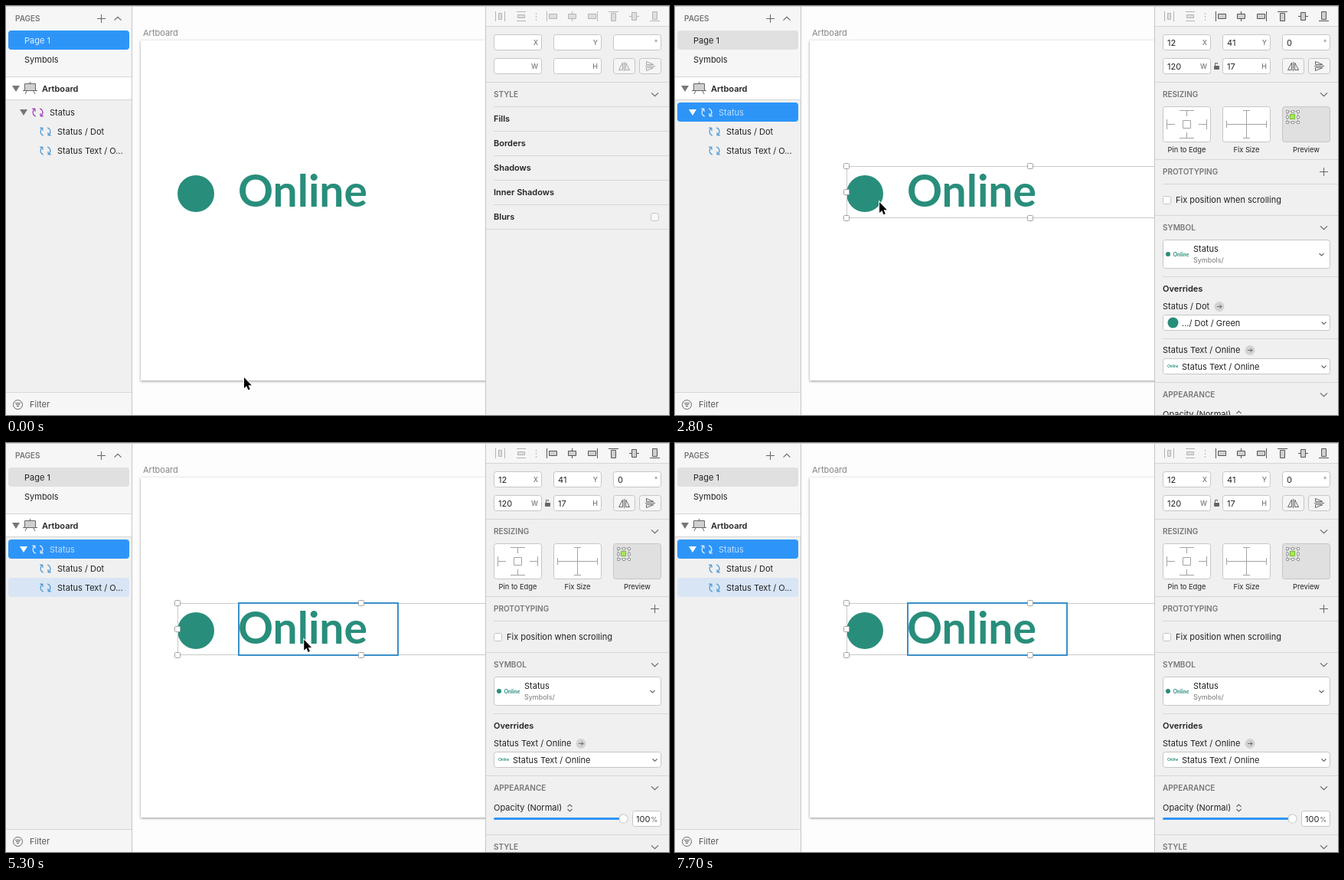
Recreate the animation shown at these times as an HTML page with a canvas. Size 866 by 534 pixels, loop 7.8 s.

```html
<!DOCTYPE html>
<html lang="en">
<head>
<meta charset="utf-8">
<title>Nested symbol selection</title>
<style>
html, body { margin: 0; width: 100%; height: 100%; overflow: hidden; background: #fff; }
canvas { display: block; width: 866px; height: 534px; }
</style>
</head>
<body>
<canvas id="stage" width="866" height="534"></canvas>
<script>
const ctx = document.getElementById('stage').getContext('2d');
const LOOP = 7800, STEP = 100;
const UI = 'Inter, "Noto Sans", sans-serif', DISPLAY = 'Lato, sans-serif';
const INK = '#222', MUTED = '#777', LINE = '#d6d6d6', EDGE = '#c6c6c6';
const BLUE = '#2e95f8', OUTLINE = '#3a8fca', TEAL = '#288e7b', PANEL = '#f0f0f0', LIGHT = '#f6f6f6';

// time, x, y of the pointer tip
const POINTER = [
  [0, 311, 485], [800, 297, 270], [1100, 294, 261], [1600, 293, 253], [1900, 293, 253],
  [2700, 268, 256], [3200, 259, 256], [3500, 259, 256], [4300, 284, 262], [4700, 298, 256],
  [5000, 389, 257], [5200, 389, 257], [5500, 390, 256], [6400, 390, 257],
  [7200, 376, 449], [7600, 364, 540], [7800, 364, 540]
];
const CLICKS = [[1400, 1600], [3200, 3500], [4900, 5100]];

function pointerAt(t) {
  const i = Math.max(1, POINTER.findIndex(p => p[0] > t));
  const [t0, x0, y0] = POINTER[i - 1], [t1, x1, y1] = POINTER[i];
  const u = (t - t0) / (t1 - t0), k = u * u * (3 - 2 * u);
  return [x0 + (x1 - x0) * k, y0 + (y1 - y0) * k];
}

function text(s, x, y, { size = 11, weight = 400, color = INK, align = 'left', family = UI } = {}) {
  ctx.font = `${weight} ${size}px ${family}`;
  ctx.fillStyle = color;
  ctx.textAlign = align;
  ctx.fillText(s, x, y);
}
const bold = (s, x, y) => text(s, x, y, { weight: 600 });
const heading = (s, y, x = 637) => text(s, x, y, { size: 10, weight: 600, color: MUTED });

function fill(x, y, w, h, color) {
  ctx.fillStyle = color;
  ctx.fillRect(x, y, w, h);
}

function box(x, y, w, h, r, color, edge) {
  ctx.beginPath();
  ctx.roundRect(edge ? x + .5 : x, edge ? y + .5 : y, edge ? w - 1 : w, edge ? h - 1 : h, r);
  if (color) { ctx.fillStyle = color; ctx.fill(); }
  if (edge) { ctx.strokeStyle = edge; ctx.lineWidth = 1; ctx.stroke(); }
}

function disc(x, y, r, color) {
  ctx.beginPath();
  ctx.arc(x, y, r, 0, 7);
  ctx.fillStyle = color;
  ctx.fill();
}

function path(points, color, width = 1, closed = false) {
  ctx.beginPath();
  points.forEach(([x, y]) => ctx.lineTo(x, y));
  if (closed) ctx.closePath();
  ctx.strokeStyle = color;
  ctx.lineWidth = width;
  ctx.stroke();
}

function polygon(points, color) {
  ctx.beginPath();
  points.forEach(([x, y]) => ctx.lineTo(x, y));
  ctx.fillStyle = color;
  ctx.fill();
}

const rule = (y, x = 627) => fill(x, y, 866 - x, 1, LINE);
const chevron = (x, y, w = 4.5, h = 2.2, color = '#666') =>
  path([[x - w, y - h], [x, y + h], [x + w, y - h]], color, 1.1);

function plus(x, y) {
  fill(x - 5, y, 11, 1, '#666');
  fill(x, y - 5, 1, 11, '#666');
}

function frame(x, y, w, h) {
  ctx.strokeStyle = OUTLINE;
  ctx.lineWidth = 2;
  ctx.strokeRect(x + 1, y + 1, w - 2, h - 2);
}

function symbolIcon(x, y, color) {
  ctx.strokeStyle = color;
  ctx.lineWidth = 1.2;
  for (const side of [-1, 1]) {
    ctx.beginPath();
    ctx.arc(x + side, y, 5.4, side < 0 ? 1.9 : -1.25, side < 0 ? 4.2 : 1.05);
    ctx.stroke();
    const tx = x + side * 3.7, ty = y + side * 4.7;
    path([[tx - side * .3, ty - side * 3.6], [tx, ty], [tx + side * 3.6, ty + side * .2]], color, 1.2);
  }
}

function sidebar(s) {
  fill(0, 0, 164, 534, PANEL);
  fill(0, 0, 164, 92, LIGHT);
  heading('PAGES', 20, 12);
  plus(124, 16);
  chevron(146, 16.5, 4.5, -2.2);
  box(3, 32, 158, 25, 4, s.selected ? '#e0e0e0' : BLUE);
  text('Page 1', 24, 49, { color: s.selected ? INK : '#e4f1ff' });
  text('Symbols', 24, 74);

  fill(0, 92, 164, 31, LINE);
  fill(0, 93, 164, 29, '#fff');
  polygon([[8, 104], [18, 104], [13, 112]], '#777');
  box(24, 101, 15, 10, 0, '#d0d0d0', '#666');
  fill(22, 110, 19, 1, '#666');
  path([[27, 111], [25, 115]], '#666');
  path([[36, 111], [38, 115]], '#666');
  fill(31, 99, 1, 2, '#666');
  bold('Artboard', 47, 112);

  if (s.hover) box(3, 126, 158, 25, 4, '#ececec', '#c9c9c9');
  if (s.selected) {
    box(3, 126, 158, 25, 4, BLUE);
    if (s.part) box(3, s.part === 'dot' ? 151 : 176, 158, 25, 4, '#d8e5f5');
  }
  polygon([[18, 135], [28, 135], [23, 143]], s.selected ? '#fff' : '#777');
  symbolIcon(41.5, 139, s.selected ? '#e9f4ff' : '#9b35b8');
  text('Status', 57, 143, { color: s.selected ? '#bfdfff' : INK });
  symbolIcon(51.5, 164, '#4596d3');
  text('Status / Dot', 67, 168);
  symbolIcon(51.5, 189, '#4596d3');
  text('Status Text / O...', 67, 193);

  fill(0, 504, 164, 30, LIGHT);
  fill(0, 504, 164, 1, LINE);
  ctx.beginPath();
  ctx.arc(15.5, 520.5, 6, 0, 7);
  ctx.strokeStyle = '#666';
  ctx.lineWidth = 1;
  ctx.stroke();
  [[12, 7], [13, 5], [14, 3]].forEach(([x, w], i) => fill(x, 518 + i * 2, w, 1, '#666'));
  text('Filter', 31, 524, { color: '#555' });
  fill(164, 0, 1, 534, EDGE);
}

function artboard(s) {
  fill(165, 0, 461, 534, '#fdfdfd');
  ctx.save();
  ctx.beginPath();
  ctx.rect(165, 0, 461, 534);
  ctx.clip();
  text('Artboard', 179, 39, { color: '#858585' });
  ctx.shadowColor = 'rgba(0,0,0,.42)';
  ctx.shadowBlur = 3;
  ctx.shadowOffsetY = 1;
  fill(176, 45, 520, 444, '#fff');
  ctx.shadowColor = 'transparent';

  disc(248, 245, 24, TEAL);
  text('Online', 303, 262, { size: 57, weight: 700, color: TEAL, family: DISPLAY });
  if (s.hover) frame(223, 208, 480, 70);
  if (s.selected) {
    ctx.strokeStyle = '#c9c9c9';
    ctx.lineWidth = 1;
    ctx.strokeRect(224.5, 209.5, 480, 67);
    if (s.part === 'dot') frame(223, 220, 50, 50);
    if (s.part === 'text') frame(303, 208, 210, 70);
    for (const [x, y] of [[224, 209], [464, 209], [224, 243], [224, 277], [464, 277]])
      box(x - 4, y - 4, 8, 8, 1, '#fff', '#a2a2a2');
  }
  ctx.restore();
}

function alignIcons(active) {
  const off = '#b4b4b4', on = active ? '#555' : off, body = active ? '#cfcfcf' : '#dedede';
  fill(639, 7, 1, 13, off); fill(651, 7, 1, 13, off);
  box(643, 9, 5, 9, 0, '#dedede', off);
  fill(667, 7, 12, 1, off); fill(667, 19, 12, 1, off);
  box(668, 11, 10, 5, 0, '#dedede', off);
  for (const y of [9, 13, 17]) fill(692, y, 1, 2, off);
  [[706, 709], [739, 734], [772, 760]].forEach(([x, bx]) => {
    fill(x, 7, 1, 13, on);
    box(bx, 10, 11, 7, 0, body, on);
  });
  [[7, 9], [13, 8], [19, 7]].forEach(([y, by], i) => {
    const x = 787 + 27 * i;
    fill(x, y, 13, 1, on);
    box(x + 3, by, 7, 11, 0, body, on);
  });
}

function field(x, y, value, label) {
  box(x, y, 63, 21, 3, '#fff', EDGE);
  text(value, x + 6, y + 15);
  text(label, x + 58, y + 14, { size: 9, weight: 500, color: MUTED, align: 'right' });
}

function geometry(active) {
  const v = active ? ['12', '41', '0', '120', '17'] : ['', '', '', '', ''];
  field(637, 37, v[0], 'X');
  field(715, 37, v[1], 'Y');
  field(793, 37, v[2], '°');
  field(637, 68, v[3], 'W');
  field(715, 68, v[4], 'H');
  const c = active ? '#666' : '#a5a5a5';
  box(793, 68, 29, 21, 3, '#f5f5f5', EDGE);
  box(827, 68, 29, 21, 3, '#f5f5f5', EDGE);
  fill(807, 73, 1, 12, c);
  path([[805.5, 74], [805.5, 83.5], [800.5, 83.5]], c, 1, true);
  path([[809.5, 74], [809.5, 83.5], [814.5, 83.5]], c, 1, true);
  fill(835, 78, 13, 1, c);
  path([[836.5, 72.5], [836.5, 76.5], [846, 76.5]], c, 1, true);
  path([[836.5, 84.5], [836.5, 80.5], [846, 80.5]], c, 1, true);
  if (active) {
    box(704, 78, 7, 5, 1, '#666');
    path([[705.5, 78], [705.5, 74.5], [708.5, 74.5], [708.5, 76]], '#666');
  }
  rule(99);
}

function emptyInspector() {
  heading('STYLE', 119);
  chevron(847.5, 115.5);
  ['Fills', 'Borders', 'Shadows', 'Inner Shadows', 'Blurs'].forEach((name, i) => {
    rule(131 + 32 * i, 637);
    bold(name, 637, 151 + 32 * i);
  });
  box(842, 270, 11, 11, 3, '#f8f8f8', '#c2c2c2');
  rule(291);
}

function resizing() {
  heading('RESIZING', 119);
  chevron(847.5, 115.5);
  [637, 715, 793].forEach((x, i) => box(x, 131, 63, 47, 3, i < 2 ? '#fff' : '#e0e0e0', EDGE));
  const c = '#a2a2a2';
  box(663, 149, 11, 11, 0, '#fff', c);
  fill(668, 136, 1, 8, c); fill(668, 165, 1, 8, c);
  fill(642, 154, 11, 1, c); fill(684, 154, 11, 1, c);
  fill(659, 136, 19, 1, c); fill(659, 172, 19, 1, c);
  fill(642, 148, 1, 13, c); fill(694, 148, 1, 13, c);
  fill(720, 154, 53, 1, c); fill(746, 136, 1, 37, c);
  fill(720, 150, 1, 9, c); fill(772, 150, 1, 9, c);
  fill(742, 136, 9, 1, c); fill(742, 172, 9, 1, c);
  box(799, 137, 15, 15, 0, null, '#aaa');
  box(803, 141, 7, 7, 0, '#a4e858', '#79bd32');
  for (const x of [799, 806, 813]) for (const y of [137, 144, 151])
    if (x !== 806 || y !== 144) box(x - 1, y - 1, 4, 4, 0, '#fff', '#999');
  [['Pin to Edge', 668], ['Fix Size', 746], ['Preview', 824]].forEach(([s, x]) =>
    text(s, x + .5, 191, { size: 9.3, align: 'center' }));
}

function override(y, isDot) {
  const label = isDot ? 'Status / Dot' : 'Status Text / Online';
  const ax = isDot ? 711 : 751;
  text(label, 637, y);
  disc(ax, y - 3.5, 6.5, '#d3d3d3');
  path([[ax - 3, y - 3.5], [ax + 3, y - 3.5]], '#666');
  path([[ax + .5, y - 6], [ax + 3, y - 3.5], [ax + .5, y - 1]], '#666');
  box(637, y + 7, 219, 21, 3, '#fff', EDGE);
  if (isDot) {
    disc(650.5, y + 17.5, 7, TEAL);
    text('.../ Dot / Green', 662, y + 22);
  } else {
    text('Online', 643, y + 19, { size: 4.8, weight: 700, color: TEAL, family: DISPLAY });
    text(label, 662, y + 22);
  }
  chevron(847.5, y + 18, 3, 1.5);
}

function appearance(y) {
  rule(y);
  heading('APPEARANCE', y + 20);
  chevron(847.5, y + 16.5);
  text('Opacity (Normal)', 637, y + 46);
  chevron(736.5, y + 39.5, 3, -1.5);
  chevron(736.5, y + 45.5, 3, 1.5);
  box(637, y + 55, 168, 3, 1.5, BLUE);
  disc(806.5, y + 56.5, 6, '#b9b9b9');
  disc(806.5, y + 56.5, 5.2, '#fff');
  box(818, y + 46, 38, 21, 3, '#fff', EDGE);
  text('100', 823, y + 61);
  text('%', 851, y + 61, { size: 9, color: '#666', align: 'right' });
  rule(y + 77);
  heading('STYLE', y + 97);
  chevron(847.5, y + 93.5);
}

function symbolInspector(part) {
  resizing();
  rule(200);
  heading('PROTOTYPING', 220);
  plus(847, 216);
  rule(232, 637);
  box(637, 248, 11, 11, 2, '#fff', '#c4c4c4');
  text('Fix position when scrolling', 654, 257);
  rule(273);
  heading('SYMBOL', 293);
  chevron(847.5, 289.5);
  box(637, 305, 219, 38, 3, '#fff', EDGE);
  disc(644, 324, 3, TEAL);
  text('Online', 650.5, 326.5, { size: 7, weight: 700, color: TEAL, family: DISPLAY });
  text('Status', 677, 321);
  text('Symbols/', 677, 335, { size: 9, color: MUTED });
  chevron(844.5, 324.5, 3, 1.5);
  rule(353, 637);
  bold('Overrides', 637, 373);
  override(396, part !== 'text');
  if (part) return appearance(434);
  rule(434, 637);
  override(453, false);
  appearance(491);
}

function inspector(s) {
  fill(626, 0, 240, 534, PANEL);
  fill(627, 0, 239, 26, LIGHT);
  rule(26);
  alignIcons(s.detail);
  geometry(s.detail);
  if (s.detail) symbolInspector(s.detailPart);
  else emptyInspector();
  fill(626, 0, 1, 534, EDGE);
}

function pointer(x, y, pressed) {
  if (pressed) {
    for (const [color, width] of [['rgba(255,255,255,.9)', 4], ['#111', 1.8]]) {
      ctx.beginPath();
      ctx.arc(x, y + 1, 21.5, 0, 7);
      ctx.strokeStyle = color;
      ctx.lineWidth = width;
      ctx.stroke();
    }
  }
  const arrow = [[0, 0], [0, 14], [3.2, 11], [5.4, 16.2], [7.7, 15.2], [5.5, 10.2], [9.8, 10.2]]
    .map(([dx, dy]) => [x + dx, y + dy]);
  path(arrow, '#fff', 2, true);
  polygon(arrow, '#000');
}

// The inspector follows each selection one step later.
function stateAt(t) {
  const partAt = time => time >= 5000 ? 'text' : time >= 3400 ? 'dot' : null;
  return {
    hover: t >= 800 && t < 1600,
    selected: t >= 1600,
    part: partAt(t),
    detail: t >= 1700,
    detailPart: partAt(t - STEP)
  };
}

function draw(now) {
  const t = Math.floor(now % LOOP / STEP) * STEP;
  const s = stateAt(t);
  artboard(s);
  sidebar(s);
  inspector(s);
  fill(0, 0, 866, 1, '#cfcfcf');
  pointer(...pointerAt(t), CLICKS.some(([a, b]) => t >= a && t < b));
  requestAnimationFrame(tick);
}

let start;
function tick(now) {
  start ??= now;
  draw(now - start);
}
draw(0);
</script>
</body>
</html>
```
